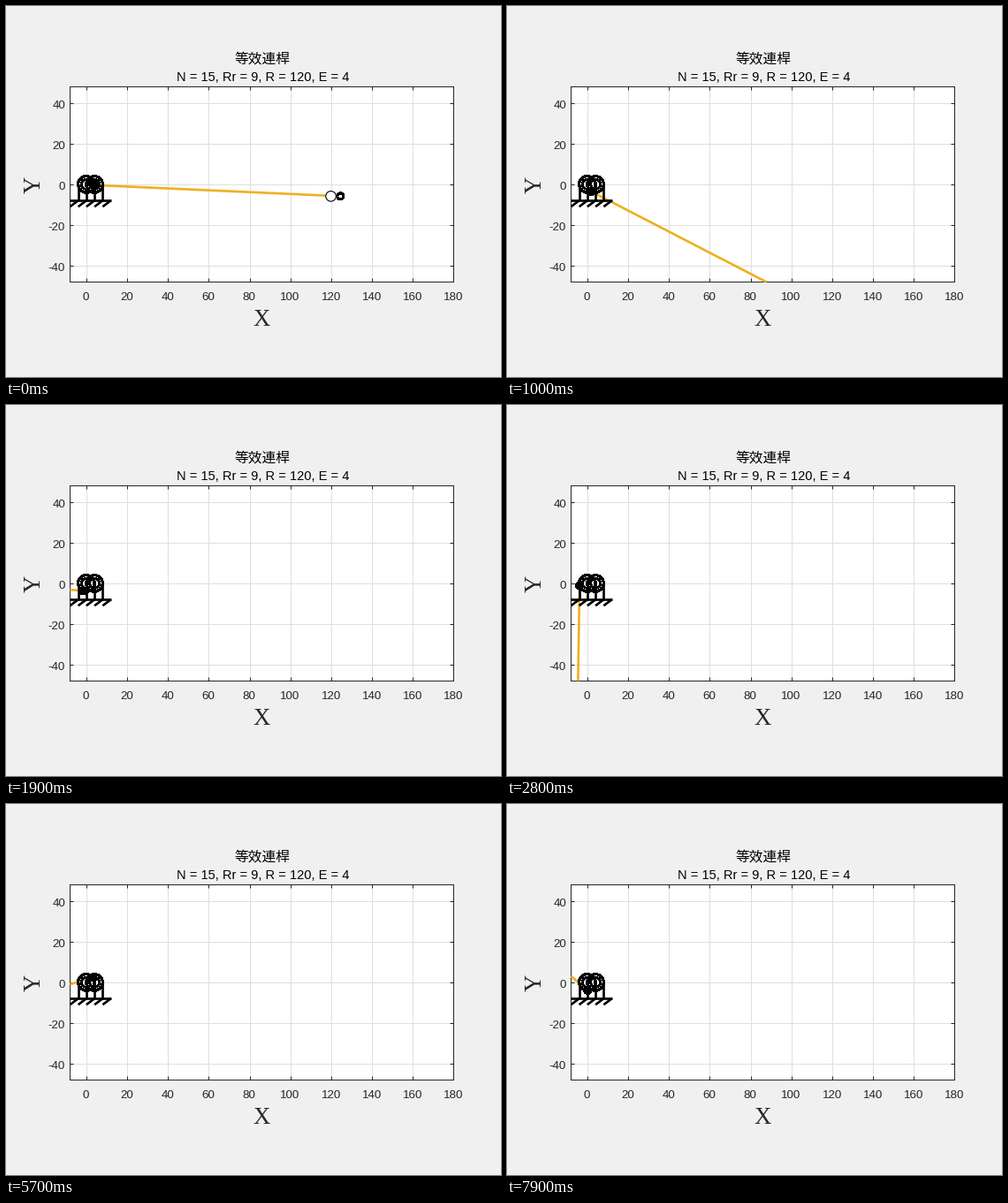
A matplotlib script for the animation above (8000 ms loop, 560 by 420 pixels).

```python
import numpy as np
import matplotlib.pyplot as plt
from matplotlib.animation import FuncAnimation
from matplotlib.patches import Circle

W, H, DPI = 560, 420, 100
PX = 72 / DPI                       # points per pixel
N, R, E = 15, 120, 4
STEP = np.radians(2.8)              # pin angle per frame
FRAMES, INTERVAL = 80, 100
XLIM, YLIM = (-8, 180), (-48, 48)
INK, YELLOW = "#262626", "#edb120"

fig = plt.figure(figsize=(W / DPI, H / DPI), dpi=DPI, facecolor="#f0f0f0")
LEFT, TOP, AW, AH = 72.4, 91.25, 434, 221.2
ax = fig.add_axes([LEFT / W, 1 - (TOP + AH) / H, AW / W, AH / H])
ax.set(xlim=XLIM, ylim=YLIM)
ax.set_xticks(range(0, 181, 20))
ax.set_yticks(range(-40, 41, 20))
ax.set_axisbelow(True)
ax.grid(color="#dfdfdf", lw=PX)
ax.tick_params(direction="in", top=True, right=True, length=4.4 * PX,
               width=PX, color=INK, labelbottom=False, labelleft=False)
for spine in ax.spines.values():
    spine.set(color=INK, lw=PX)


def label(x, y, text, size, color=INK, font="Liberation Sans", **kw):
    """Text with its baseline at pixel (x, y), y counted from the top."""
    opts = dict(ha="center", va="baseline", rotation_mode="anchor")
    opts.update(kw)
    fig.text(x / W, 1 - y / H, text, fontsize=size * PX, color=color,
             family=font, **opts)


def to_px(x, y):
    return (LEFT + (x - XLIM[0]) * AW / (XLIM[1] - XLIM[0]),
            TOP + (YLIM[1] - y) * AH / (YLIM[1] - YLIM[0]))


for v in range(0, 181, 20):
    label(to_px(v, 0)[0] - 0.3, 333, str(v), 13.33)
for v in range(-40, 41, 20):
    label(67, to_px(0, v)[1] + 6.2, str(v), 13.33, ha="right")
label(290, 64.5, "等效連桿", 15.7, "black", "Noto Sans CJK JP")
label(290.2, 85, f"N = {N}, Rr = 9, R = {R}, E = {E}", 14.67, "black")
label(289.3, 362, "X", 26.7, font="Liberation Serif")
label(39, 202, "Y", 26.7, font="Liberation Serif", rotation=90)


def circle(x, y, r, lw, face="none", z=5, smooth=False):
    return ax.add_patch(Circle((x, y), r, ec="black", fc=face, lw=lw * PX,
                               zorder=z, antialiased=smooth))


def stroke(xs, ys):
    ax.plot(xs, ys, color="black", lw=2.67 * PX, zorder=5,
            solid_capstyle="butt")


def support(x):
    circle(x, 0, 4, 2.2)
    circle(x, 0, 2.4, 1.8, "white", 4)
    for side in (-4, 4):
        stroke([x + side] * 2, [0, -8])


support(0)
support(E)
stroke([-8, 12], [-8, -8])
for x in range(-4, 13, 4):
    stroke([x, x - 4], [-8, -11])

coupler, = ax.plot([], [], color=YELLOW, lw=2.67 * PX, zorder=3,
                   solid_capstyle="butt", clip_on=False)
crank_joint = circle(0, 0, 1.5, 2, z=6)
far_joint = circle(0, 0, 1.5, 2, "white", 6)
pin = circle(0, 0, 2.5, 1.1, "white", 7, smooth=True)


def linkage(u):
    """Crank tip, pin centre and centre of curvature as complex numbers."""
    tip = E * np.exp(-2j * u)
    p = R * np.exp(-1j * u)
    normal = p - N * tip
    bend = R**2 + E**2 * N**3 - R * E * N * (N + 1) * np.cos(u)
    return tip, p, p - normal * abs(normal)**2 / bend


def clipped_end(a, b):
    """Point where the segment from a (inside) to b leaves the axes."""
    t = 1
    for start, d, (lo, hi) in ((a.real, (b - a).real, XLIM),
                               (a.imag, (b - a).imag, YLIM)):
        if d:
            t = min(t, ((hi if d > 0 else lo) - start) / d)
    return a + t * (b - a)


def update(i):
    tip, p, k = linkage(STEP * (i + 1))
    end = clipped_end(tip, k)
    coupler.set_data([tip.real, end.real], [tip.imag, end.imag])
    for patch, z in ((crank_joint, tip), (pin, p), (far_joint, k)):
        patch.center = z.real, z.imag
    return coupler, crank_joint, far_joint, pin


anim = FuncAnimation(fig, update, frames=FRAMES, interval=INTERVAL,
                     init_func=lambda: update(0), repeat=True,
                     repeat_delay=0, blit=False)
plt.show()
```
